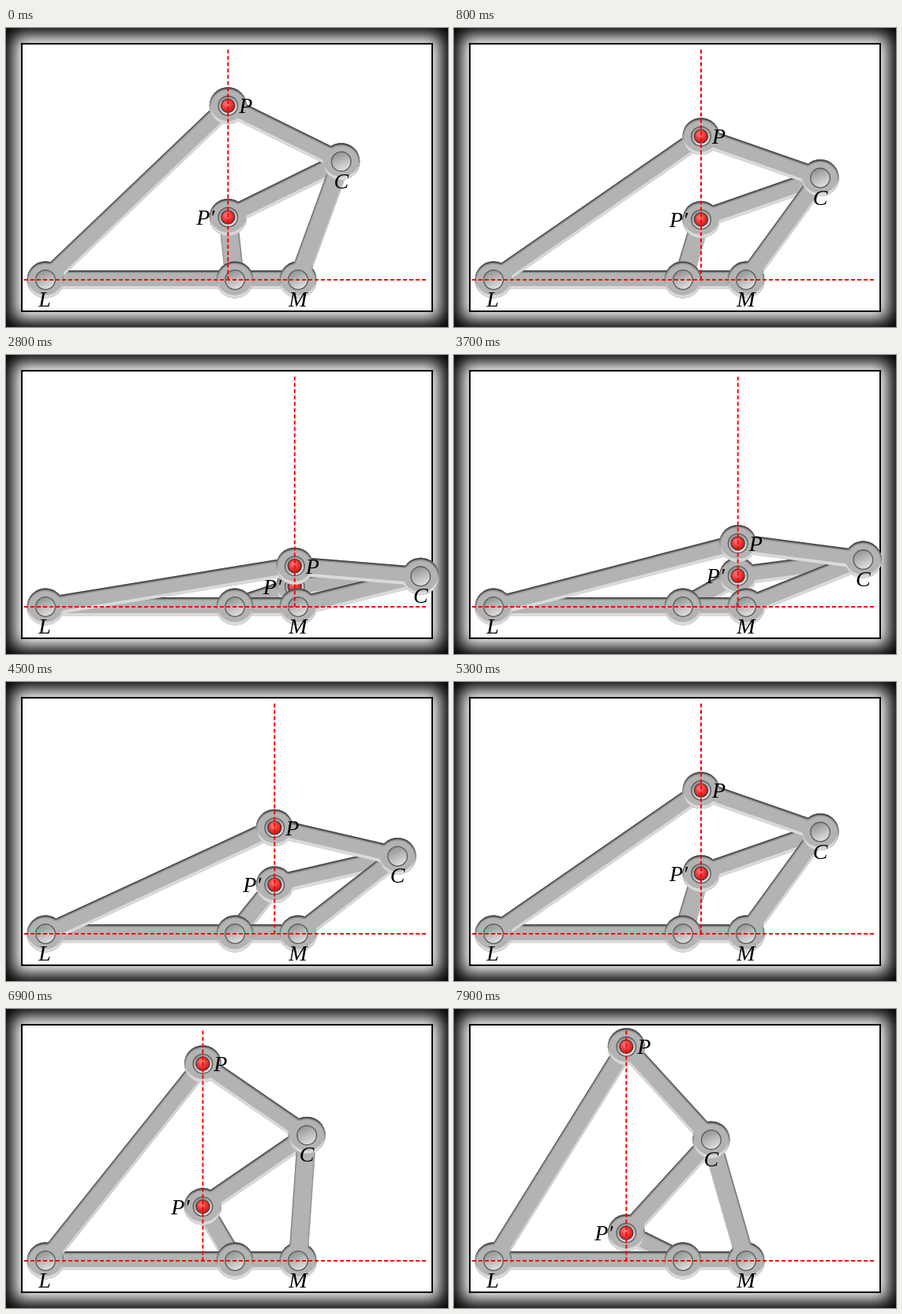
These frames come from a looping animation (560x380 px, 8000 ms). An HTML page:

```html
<!DOCTYPE html>
<html lang="en">
<head>
<meta charset="utf-8">
<title>Linkage</title>
<style>
html, body { margin: 0; width: 100%; height: 100%; overflow: hidden; background: #000; }
.frame {
  position: absolute; left: 19px; top: 19px; width: 518px; height: 338px;
  border: 2px solid #000; background: #fff; box-shadow: 0 0 20px 9px #fff;
}
svg { position: absolute; left: 0; top: 0; }
text { font: italic 28px "Liberation Serif", serif; }
.link { fill: #b3b3b3; stroke: none; filter: url(#bevel); }
.link line { stroke: #b3b3b3; stroke-width: 24; }
.axis { stroke: #f00; stroke-width: 2; stroke-dasharray: 5 3; }
.hole { fill: url(#steel); stroke: #585858; stroke-width: 1.3; }
.ball { fill: url(#red); stroke: #4a3030; stroke-width: 1.2; }
</style>
</head>
<body>
<div class="frame"></div>
<svg width="560" height="380" viewBox="0 0 560 380">
  <defs>
    <filter id="bevel" filterUnits="userSpaceOnUse" x="0" y="0" width="560" height="380" color-interpolation-filters="sRGB">
      <feGaussianBlur in="SourceAlpha" stdDeviation=".6"/>
      <feOffset dy="-4" result="up"/>
      <feFlood flood-color="#dadada"/>
      <feComposite in2="up" operator="out"/>
      <feComposite in2="SourceAlpha" operator="in" result="light"/>
      <feGaussianBlur in="SourceAlpha" stdDeviation="1.2"/>
      <feOffset dy="1.6" result="down"/>
      <feFlood flood-color="#333"/>
      <feComposite in2="down" operator="out"/>
      <feComposite in2="SourceAlpha" operator="in" result="dark"/>
      <feMerge>
        <feMergeNode in="SourceGraphic"/>
        <feMergeNode in="light"/>
        <feMergeNode in="dark"/>
      </feMerge>
    </filter>
    <linearGradient id="steel" x1=".25" y1="0" x2=".7" y2="1">
      <stop offset="0" stop-color="#8e8e8e"/>
      <stop offset="1" stop-color="#e4e4e4"/>
    </linearGradient>
    <radialGradient id="red" cx=".4" cy=".35" r=".65">
      <stop offset="0" stop-color="#ff8080"/>
      <stop offset=".5" stop-color="#ee3c3c"/>
      <stop offset="1" stop-color="#c41c1c"/>
    </radialGradient>
  </defs>
  <g id="rig"></g>
</svg>
<script>
const rig = document.getElementById('rig');
const STEP = 100, STEPS = 80;
const L = { x: 50, y: 320 }, O = { x: 290, y: 320 }, M = { x: 370, y: 320 };
const C = {}, P = {}, Q = {};
const updates = [];

function add(parent, tag, attrs) {
  const el = document.createElementNS('http://www.w3.org/2000/svg', tag);
  set(el, attrs);
  return parent.appendChild(el);
}

function set(el, attrs) {
  for (const k in attrs) el.setAttribute(k, attrs[k]);
}

function disc(parent, p, r, cls) {
  const el = add(parent, 'circle', { r, class: cls });
  updates.push(() => set(el, { cx: p.x, cy: p.y }));
}

function link(a, b) {
  const g = add(rig, 'g', { class: 'link' });
  const bar = add(g, 'line', {});
  updates.push(() => set(bar, { x1: a.x, y1: a.y, x2: b.x, y2: b.y }));
  disc(g, a, 23.5, 'end');
  disc(g, b, 23.5, 'end');
}

function pin(p, red) {
  disc(rig, p, 12.3, 'hole');
  if (red) disc(rig, p, 8.5, 'ball');
}

function label(p, str, dx, dy, anchor) {
  const el = add(rig, 'text', { 'text-anchor': anchor });
  el.textContent = str;
  updates.push(() => set(el, { x: p.x + dx, y: p.y + dy }));
}

// Mirror M in the line from a fixed pivot through C.
function mirror(out, pivot) {
  const turn = 2 * Math.atan2(C.y - pivot.y, C.x - pivot.x);
  const r = M.x - pivot.x;
  out.x = pivot.x + r * Math.cos(turn);
  out.y = pivot.y + r * Math.sin(turn);
}

function pose(step) {
  const angle = (9 + 2 * Math.abs(step - 30.5)) * Math.PI / 180;
  C.x = M.x + 160 * Math.cos(angle);
  C.y = M.y - 160 * Math.sin(angle);
  mirror(P, L);
  mirror(Q, O);
  updates.forEach(f => f());
}

link(O, Q);
link(C, Q);
pin(Q, true);
link(L, M);
disc(add(rig, 'g', { class: 'link' }), O, 23.5, 'end');
link(M, C);
link(L, P);
link(P, C);
[L, O, M, C].forEach(p => pin(p));
pin(P, true);

add(rig, 'line', { class: 'axis', x1: 23, y1: 320, x2: 533, y2: 320 });
const rail = add(rig, 'line', { class: 'axis', y1: 27.5, y2: 320 });
updates.push(() => set(rail, { x1: P.x, x2: P.x }));

label(L, 'L', -1, 34, 'middle');
label(M, 'M', 0, 34, 'middle');
label(C, 'C', 0, 34, 'middle');
label(P, 'P', 14, 9.5, 'start');
label(Q, 'P′', -40, 9.5, 'start');

let shown = -1;
function tick() {
  const step = Math.floor(performance.now() / STEP) % STEPS;
  if (step !== shown) pose(shown = step);
  requestAnimationFrame(tick);
}
tick();
</script>
</body>
</html>
```
